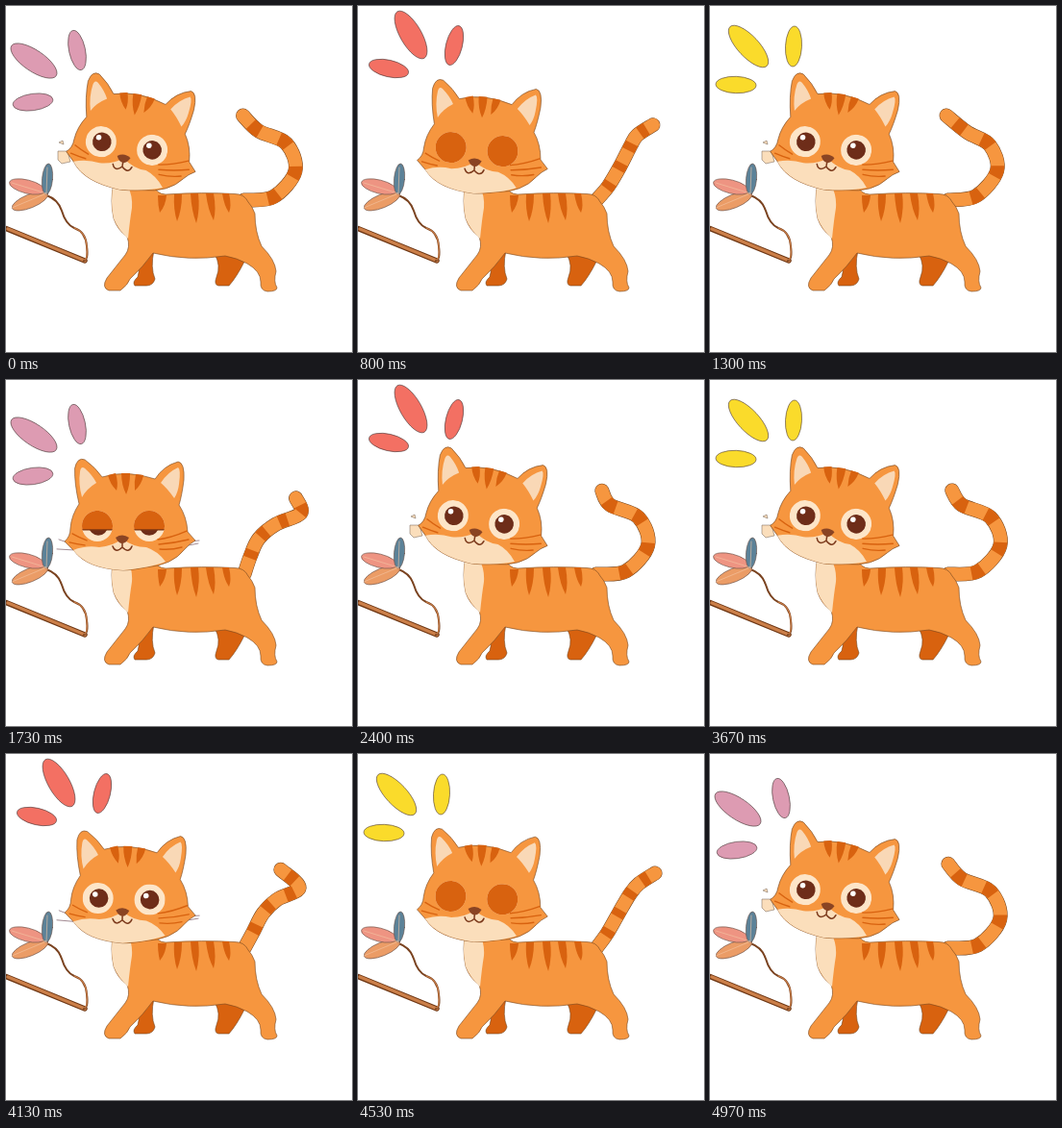
These frames come from a looping animation (360 by 360 pixels, 5 s). An HTML page:

```html
<!DOCTYPE html>
<html lang="en">
<head>
<meta charset="utf-8">
<title>Cat and feather toy</title>
<style>
html, body { margin: 0; width: 100%; height: 100%; overflow: hidden; background: #fff; }
svg { display: block; width: 100vw; height: 100vh; }
.fur { fill: #f6963f; }
.dark { fill: #d8620f; }
.cream { fill: #fbdebb; }
.edge { stroke: #74451f; stroke-width: .6; }
.line { fill: none; stroke-linecap: round; stroke-linejoin: round; }
</style>
</head>
<body>
<svg viewBox="0 0 360 360">
  <defs>
    <clipPath id="tailArea"><path d="M0 0H318V360H0Z"/></clipPath>
    <clipPath id="eyes"><circle cx="95" cy="152" r="16"/><circle cx="149" cy="152" r="16"/></clipPath>
  </defs>

  <g id="petals" stroke="#4d3b3b" stroke-width=".6">
    <ellipse rx="28" ry="11"/><ellipse rx="8.5" ry="21"/><ellipse rx="21" ry="8.7"/>
  </g>

  <g id="toy" class="line">
    <path d="M0 231.5L82 265" stroke="#6e3714" stroke-width="5.5"/>
    <path d="M2 232L82 265" stroke="#cb7f49" stroke-width="3.4"/>
    <path id="string" d="M81 265Q86 264 84 250Q83 235 71 231Q62 227 58 213Q54 201 42 197" stroke="#7a4320" stroke-width="2"/>
    <path d="M82 264Q85 262 84 250Q83 235 71 231" stroke="#cb7f49" stroke-width="1.2"/>
    <g stroke="#6b5148" stroke-width=".6">
      <ellipse cx="25" cy="203" rx="20" ry="7" fill="#eb9c66" transform="rotate(-22 25 203)"/>
      <ellipse cx="22" cy="188" rx="19" ry="7" fill="#ee9482" transform="rotate(14 22 188)"/>
      <ellipse cx="43" cy="180" rx="5.5" ry="16" fill="#5c8298" transform="rotate(5 43 180)"/>
      <path d="M6 210L42 195L6 184M43 168L42 196" stroke="#f4c7a4"/>
    </g>
  </g>

  <g class="line" clip-path="url(#tailArea)">
    <path class="tail" stroke="#74451f" stroke-width="15"/>
    <path class="tail" stroke="#f6963f" stroke-width="14"/>
    <path class="tail" pathLength="100" stroke="#d8620f" stroke-width="14" stroke-linecap="butt" style="stroke-linecap:butt" stroke-dasharray="0 16 8 15 8 15 8 14 8 100"/>
  </g>

  <path class="dark edge" d="M154 254Q150 272 155 284Q153 291 146 291H134Q131 287 137 282Q140 272 136 266Z"/>
  <path class="dark edge" d="M217 258Q224 270 219 282Q216 290 221 291H232Q240 282 248 266L240 256Z"/>
  <path class="fur edge" d="M112 184Q108 203 112 221Q116 233 126 240Q130 251 124 259L105 283Q99 293 107 296H119Q127 290 129 284Q143 271 153 257Q190 266 228 260Q240 262 251 268Q265 276 265 287Q264 296 272 297Q282 297 282 293Q278 287 281 276Q280 264 266 250Q259 235 259 216Q256 208 252 204Q248 195.5 238 195.5Q205 193.5 166 196Q157 196 151 184Z"/>
  <path class="cream" d="M112 184Q108 203 112 221Q117 233 127 242Q129 222 131 210Q132 197 126 186Z"/>
  <g class="dark" transform="translate(0 2)">
    <path d="M158 195H167Q166 206 160 213Q158 205 158 195Z"/>
    <path d="M175 194H183Q183 210 178 222Q174 210 175 194Z"/>
    <path d="M192 193H200Q202 210 198 224Q193 211 192 193Z"/>
    <path d="M208 193H216Q219 210 216 221Q210 210 208 193Z"/>
    <path d="M225 193H232Q235 206 232 213Q227 206 225 193Z"/>
  </g>

  <g id="crumbs" class="cream" stroke="#6d5a4c" stroke-width=".5">
    <path d="M54 151L64 151L67 162L58 164L54 160Z"/>
    <path d="M55 142L59 140L60 144Z"/>
  </g>

  <g id="head">
    <path id="whiskers" class="line" stroke="#997f88" stroke-width=".9" d="M53 176L70 177M55 166L66 170M186 168L201 167M190 172L200 170"/>
    <path class="fur edge" d="M71.500 92Q74 80 82 83Q93 91 100 101Q125 93 155 103Q164 89 179 85Q186 86 185 104Q183 120 180 130Q188 142 189 158L197 167Q190 171 186 176Q173 193 145 195Q130 198 122 198Q84 196 71 178L61 168Q67 163 67 154Q68 141 76 129Q71 108 71.500 92Z"/>
    <path fill="#f9d8b6" d="M77 95Q78 89 82 92Q90 99 94 107Q84 113 79 122Q75 108 77 95ZM179 91Q182 93 180 108Q179 117 175 123Q168 113 161 107Q168 96 179 91Z"/>
    <path class="dark" d="M106 99L114 97Q117 107 115 115Q108 108 106 99ZM120 97H129Q129 110 125 119Q120 109 120 97ZM135 98L143 99Q141 109 134 115Q133 106 135 98Z"/>
    <path class="cream" d="M70 177Q83 172 97 174Q111 173 121 165Q132 174 146 174Q158 178 166 189Q152 195 122 198Q84 196 70 177Z"/>
    <g clip-path="url(#eyes)">
      <path fill="#fde5c8" d="M70 130H175V175H70Z"/>
      <g fill="#6e2d19"><circle cx="96" cy="152" r="9.800"/><circle cx="149" cy="152" r="9.800"/></g>
      <g fill="#fff"><circle cx="92" cy="148" r="2.800"/><circle cx="145" cy="148" r="2.800"/></g>
      <rect id="lid" class="dark" x="70" y="135" width="110" stroke="#7c3410" stroke-width="1.2"/>
    </g>
    <path fill="#8a4423" d="M114 164Q121 159 128 164Q125 170 121 170Q117 170 114 164Z"/>
    <path class="line" stroke="#7c3a1c" stroke-width="1.5" d="M111 173Q114 181 121 174Q128 181 131 173M121 170V174"/>
    <path class="line" stroke="#d8620f" stroke-width="1.4" d="M158 166Q172 164 188 157M159 171Q174 170 190 166M160 176Q172 177 183 174M84 167Q76 164 69 160M82 172Q74 171 66 169"/>
  </g>
</svg>
<script>
const LOOP = 5000, SWING = LOOP / 4, BURST = LOOP / 3;
const $ = s => document.querySelector(s);
const tails = document.querySelectorAll('.tail');
const petals = $('#petals').children;

// each petal: x, y, rotation
const pink = { color: '#dd9bb2', at: [[29, 57, 34], [74, 46, -12], [28, 100, -8]] };
const yellow = { color: '#fadb2b', at: [[40, 42, 47], [87, 42, 3], [27, 82, 2]] };
const red = { color: '#f37063', at: [[55, 30, 60], [100, 41, 14], [32, 65, 13]] };

const curled = [[248, 202], [279, 199], [302, 172], [292, 143], [262, 130], [246, 114]];
const raised = [[248, 202], [254, 184], [263, 165], [281, 146], [300, 136], [315, 125]];

const wave = p => (1 - Math.cos(2 * Math.PI * p)) / 2;
const smooth = (a, b, x) => {
  const k = Math.min(1, Math.max(0, (x - a) / (b - a)));
  return k * k * (3 - 2 * k);
};

function burstAt(t) {
  const b = t % BURST;
  if (b < 284 || b >= 1465) return pink;
  return b >= 590 && b < 1125 ? red : yellow;
}

function spline(pts) {
  let d = 'M' + pts[0];
  for (let i = 0; i < pts.length - 1; i++) {
    const a = pts[i], b = pts[i + 1], before = pts[i - 1] || a, after = pts[i + 2] || b;
    const c1 = a.map((v, k) => v + (b[k] - before[k]) / 6);
    const c2 = b.map((v, k) => v - (after[k] - a[k]) / 6);
    d += `C${c1} ${c2} ${b}`;
  }
  return d;
}

// the base leads, the tip trails and flicks on the way up
function tailAt(p) {
  const base = Math.min(1, 1.1 * wave(p + .05)), tip = wave(p - .03);
  const flick = Math.max(0, Math.sin(2 * Math.PI * p));
  const pts = curled.map((c, i) =>
    c.map((v, k) => v + (raised[i][k] - v) * (i == 5 ? tip : base)));
  pts[3][1] += 6 * flick;
  pts[4][0] += 10 * flick;
  pts[4][1] += 4 * flick;
  return spline(pts);
}

function draw(t) {
  const p = t % SWING / SWING;
  const { color, at } = burstAt(t);
  $('#petals').setAttribute('fill', color);
  at.forEach(([x, y, r], i) =>
    petals[i].setAttribute('transform', `translate(${x} ${y}) rotate(${r})`));

  const d = tailAt(p);
  tails.forEach(e => e.setAttribute('d', d));

  const level = smooth(.05, .4, p) - smooth(.5, .8, p), up = 1 - level;
  $('#head').setAttribute('transform',
    `translate(${3.5 * up} ${-6.5 * up}) rotate(${9.3 * up} 122 152)`);
  $('#whiskers').style.opacity = level > .7 ? 1 : 0;
  $('#crumbs').style.opacity = level < .25 ? 1 : 0;

  const closed = smooth(.31, .45, p) - smooth(.67, .84, p);
  $('#lid').setAttribute('height', 38 * closed);
  $('#lid').style.opacity = closed > .01 ? 1 : 0;
}

function tick() {
  draw(performance.now() % LOOP);
  requestAnimationFrame(tick);
}
tick();
</script>
</body>
</html>
```
